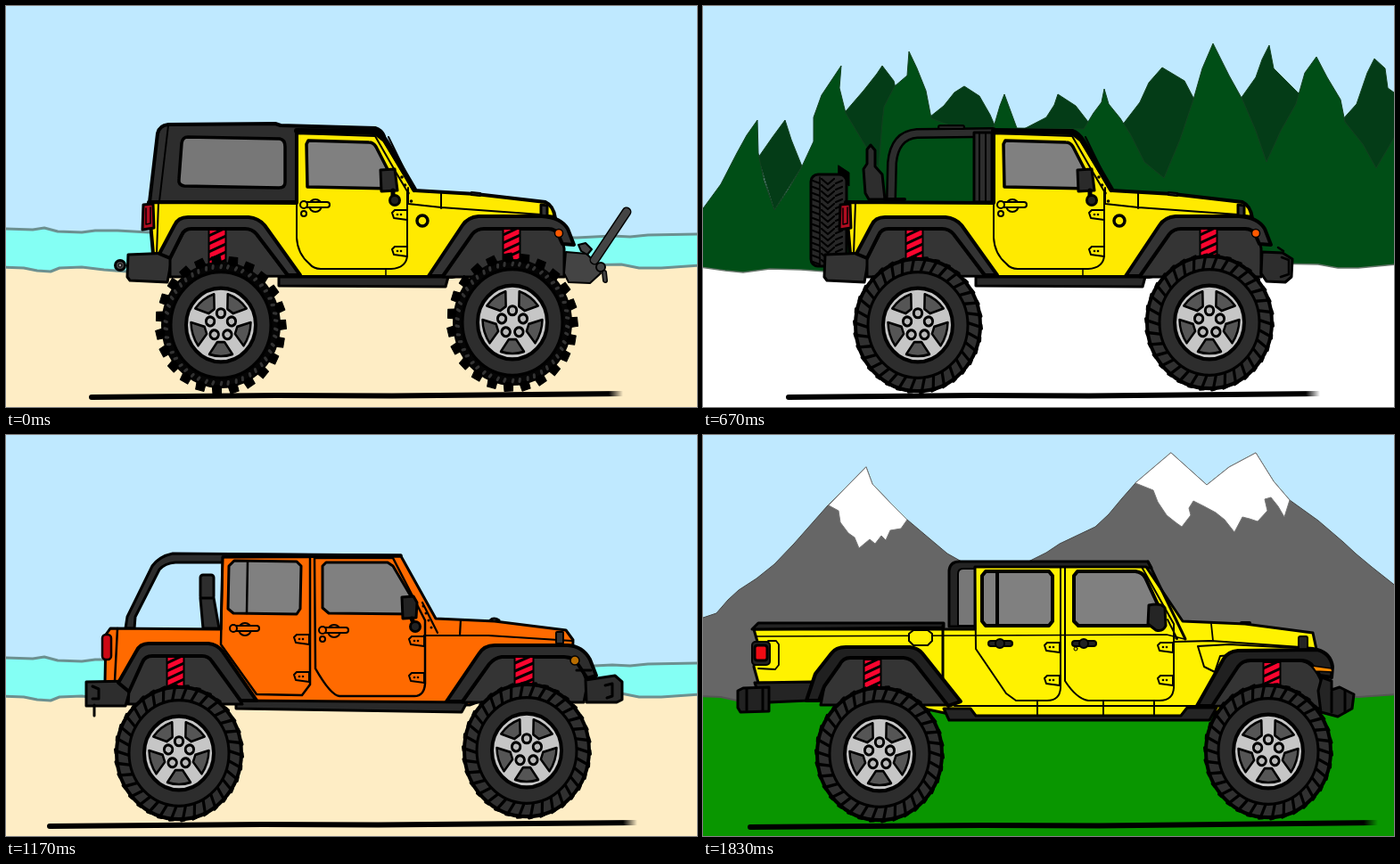
These frames come from a looping animation (775x450 px, 2.17 s). An HTML page with a canvas:

```html
<!DOCTYPE html>
<html lang="en">
<head>
<meta charset="utf-8">
<title>Off-road trucks</title>
<style>
html, body { margin: 0; width: 100%; height: 100%; overflow: hidden; background: #bfe9ff; }
canvas { display: block; }
</style>
</head>
<body>
<canvas id="stage" width="775" height="450"></canvas>
<script>
const ctx = document.getElementById('stage').getContext('2d');
const DARK = '#2d2d2d', GLASS = '#808080', RED = '#f9052f';
const YELLOW = '#ffea00', ORANGE = '#ff6a00';
ctx.lineJoin = ctx.lineCap = 'round';

function shape(d, fill, width = 3, color = '#000') {
  const p = new Path2D(d);
  if (fill) { ctx.fillStyle = fill; ctx.fill(p); }
  if (width) { ctx.lineWidth = width; ctx.strokeStyle = color; ctx.stroke(p); }
}
const line = (d, width = 2, color) => shape(d, null, width, color);

function dot(x, y, r, fill, width = 2) {
  ctx.beginPath();
  ctx.arc(x, y, r, 0, 7);
  if (fill) { ctx.fillStyle = fill; ctx.fill(); }
  if (width) { ctx.lineWidth = width; ctx.strokeStyle = '#000'; ctx.stroke(); }
}

function box(x, y, w, h, r, fill, width = 2) {
  ctx.beginPath();
  ctx.roundRect(x, y, w, h, r);
  ctx.fillStyle = fill; ctx.fill();
  if (width) { ctx.lineWidth = width; ctx.strokeStyle = '#000'; ctx.stroke(); }
}

// Backgrounds
function sky() {
  ctx.fillStyle = '#bfe9ff';
  ctx.fillRect(0, 0, 775, 450);
}

function beach() {
  sky();
  shape('M-4 250L30 251L43 249L58 253L85 254L100 252L125 252L160 254L640 260L680 258L700 259L720 257L779 256V300H-4Z',
    '#84fff4', 3, '#6c9090');
  shape('M-4 293L20 294L35 297L50 298L60 294L85 293L110 296L136 298L640 291L690 290L710 294L735 294L779 291V455H-4Z',
    '#feedc5', 3, '#6c9090');
}

function forest(ground) {
  sky();
  const edge = '#12401f', back = '#043c17';
  shape('M62 170L78 147L92 128L99 150L111 180L80 229Z', back, 1, edge);
  shape('M155 124L180 95L195 76L201 67L214 84L230 150L197 182L165 150Z', back, 1, edge);
  shape('M250 128L270 112L282 97L293 90L310 101L322 122L328 136L300 200Z', back, 1, edge);
  shape('M356 140L385 125L394 111L398 99L418 112L432 130L440 200H356Z', back, 1, edge);
  shape('M470 134L490 108L500 86L515 69L540 84L551 105L540 193H500Z', back, 1, edge);
  shape('M603 104L620 80L627 60L635 44L640 70L660 90L672 102L655 175H615Z', back, 1, edge);
  shape('M715 130L733 110L745 75L753 59L765 70L768 92L779 100V182H740Z', back, 1, edge);
  shape('M-2 230L20 200L38 165L49 145L61 128L62 165L68 195L80 229L95 207L111 180L124 152L124 125L133 100L155 67L153 92L160 120L178 150L197 182L201 130L203 113L215 90L229 78L231 51L240 70L250 95L256 126L290 139L326 136L333 112L338 99L345 118L352 137L427 138L438 120L447 108L450 93L455 110L468 126L480 145L495 175L517 193L535 150L550 105L560 70L572 42L590 78L605 105L620 140L632 175L648 140L665 110L675 75L688 57L700 80L715 105L720 130L740 155L755 182L778 143V320H-2Z',
    '#004e16', 1, edge);
  shape('M-3 293L25 297L45 299L75 295L110 296L150 299L640 289L690 290L712 294L735 294L779 290V455H-3Z',
    ground, 1.5, '#66756a');
}

function mountains() {
  sky();
  shape('M-3 206L15 200L28 185L40 174L60 161L80 145L102 122L140 79L183 36L190 55L210 76L229 95L255 117L274 133L290 142L365 142L385 132L400 122L440 103L455 89L470 71L485 54L525 20L545 38L565 56L590 36L620 20L640 52L658 73L690 96L718 120L732 133L750 148L779 171V310H-3Z',
    '#666', 1, '#444');
  shape('M183 36L190 55L210 76L229 95L222 105L210 107L205 118L200 113L193 122L187 117L175 127L170 115L163 110L154 98L152 85L141 79Z',
    '#fff', 1, '#777');
  shape('M525 20L545 38L565 56L590 36L620 20L640 52L658 73L652 92L645 80L637 70L630 72L633 85L622 97L613 94L605 92L596 109L585 95L575 87L562 80L550 74L545 82L547 90L537 103L530 98L520 90L510 75L505 62L485 54Z',
    '#fff', 1, '#777');
  shape('M-3 293L20 294L38 298L80 295L690 292L735 294L779 291V455H-3Z', '#099600', 2, '#555');
}

// Running gear
function spring(x, y, h, w = 19) {
  box(x - w / 2, y, w, h, 0, RED);
  ctx.save();
  ctx.clip();
  for (let v = y + 3; v < y + h + 10; v += 9) line(`M${x - w / 2} ${v + 4}L${x + w / 2} ${v - 5}`, 3);
  ctx.restore();
}

// Tyres are drawn slightly taller than wide.
function wheel(x, y, style, radius = 73, tall = 1.06) {
  const knobs = style === 'knob';
  ctx.save();
  ctx.translate(x, y);
  ctx.scale(radius / 73, radius / 73 * tall);
  const ring = (n, draw) => {
    for (let i = 0; i < n; i++) {
      ctx.save();
      ctx.rotate(i / n * Math.PI * 2);
      draw();
      ctx.restore();
    }
  };
  if (knobs) {
    dot(0, 0, 67, '#050505', 0);
    ring(23, () => {
      shape('M64 -5L72.5 -5.5L73.5 4L64 5.5Z', '#000', 1);
      line('M60.5 -5L63 -4.5M60.5 4L63 5', 3, '#333');
    });
  } else {
    dot(0, 0, 70, style === 'mud' ? '#4a3300' : '#303030', 4);
    ring(34, () => {
      line('M57 -2L70 2', 3.2);
      line('M71 0L71.5 4', 3);
    });
  }
  dot(0, 0, 56, '#2d2d2d', 3);
  dot(0, 0, 39, radius < 70 ? '#dcdcdc' : '#c6c6c6', 4);
  ctx.rotate(Math.PI / 2);
  ring(5, () => shape('M18 -4L31 -13Q35 0 31 13L18 4Z', '#555', 2.5));
  ctx.rotate(Math.PI / 5);
  ring(5, () => dot(12.5, 0, 4.7, '#b9b9b9', 3));
  ctx.restore();
}

function ground(x1, y1, x2, y2, width = 6) {
  const mid = (x1 + x2) / 2;
  const fade = ctx.createLinearGradient(x2 - 16, 0, x2, 0);
  fade.addColorStop(0, '#000');
  fade.addColorStop(1, width > 4 ? '#0000' : '#000');
  line(`M${x1 + 2} ${y1}L${mid - 90} ${y1 - 2}L${mid + 40} ${y1 - 1.5}L${x2} ${y2}`, width, fade);
}

function hinge(x, y, fill, w = 17) {
  shape(`M${x} ${y - 5}H${x - w + 3}L${x - w} ${y - 2}L${x - w + 2} ${y + 4}L${x} ${y + 6}Z`, fill, 2);
  dot(x - w + 6, y, 1.3, '#000', 0);
  dot(x - w + 10, y, 1.3, '#000', 0);
}

function handle(x, y, fill) {
  dot(x, y + 1, 7, fill);
  box(x - 13, y - 3, 29, 6, 3, fill);
  dot(x - 13, y, 4, fill);
}

function spare() {
  shape('M152 179L164 187V202L152 193Z', '#000', 1);
  box(121, 189, 40, 103, 8, '#272727', 3);
  for (let y = 196; y < 288; y += 7) {
    line(`M123 ${y}L131 ${y + 3}M133 ${y - 2}L140 ${y + 4}L147 ${y - 2}M149 ${y + 3}L156 ${y}`, 2.2);
  }
  line('M131 192V289', 1.5);
}

// Two-door
function shortTruck({ top, tyre, tow, hasSpare, hood }) {
  if (hasSpare) spare();
  if (top) {
    shape('M161 220L170 143Q172 134 182 133L302 132L308 134L414 137Q421 139 424 146L328 148L326 220Z', DARK, 4);
    line('M172 219L182 134', 2);
    shape('M204 147L307 149Q313 150 313 158V198Q313 204 306 204L200 202Q193 201 194 194L197 154Q198 147 204 147Z', '#777', 3.5);
  } else {
    shape('M186 217L182 210L180 183L184 177V161L188 156L193 162V180L201 189L204 217Z', DARK);
    line('M211 217L212 176Q215 145 240 143L325 142', 12);
    line('M211 217L212 176Q215 145 240 143L325 142', 7, DARK);
    box(304, 142, 20, 78, 0, DARK, 3);
    line('M310 143V219M317 143V219');
    box(264, 134, 29, 4, 2, '#222', 2);
    line('M204 217H226', 4);
  }
  shape('M160 220L326 221V142L414 143L424 151L458 207L527 211L605 220Q614 224 616 238L625 275L500 304H326L165 278Z', YELLOW, 4);
  line('M326 140L414 141Q421 143 427 153L458 206', 6);
  line('M171 220L169 278');
  line('M429 147L451 192', 2);
  shape('M326 143V260Q327 278 340 289Q345 295 353 295L432 295Q449 294 450 280V208L437 186L414 146Z', null, 2);
  shape('M339 151L407 153Q412 153 415 158L434 195V205L338 203L337 155Z', GLASS, 3.5);
  line('M451 222L488 226L600 234L616 236M488 208V227M451 204V222', 2);
  line('M426 296V303', 1.5);
  for (let i = 0; i < 4; i++) dot(444 + i * 3.5, 192 + i * 9, 1.8, '#000', 0);
  shape('M522 209L532 210V213L522 212Z', '#222', 2);
  shape('M600 223L607 224V236L600 235Z', '#333');
  if (hood) {
    shape('M424 145L440 148L456 146L455 157L446 161L470 207L520 211L598 221L597 235L552 231L467 230L458 210Z', '#050505', 2);
    line('M471 206L598 221M488 207V214', 1, '#333');
  }
  shape('M420 184L436 183L439 207L421 208Z', '#2a2a2a');
  line('M434 207V218', 5);
  dot(436, 218, 5.5, '#222', 3);
  handle(347, 223, YELLOW);
  dot(334, 233, 3, YELLOW);
  hinge(450, 234, YELLOW);
  hinge(450, 275, YELLOW);
  dot(467, 241, 6, YELLOW, 3.5);

  shape('M306 304H496L493 315L306 314Z', '#292929', 3);
  shape('M137 279L187 277L181 310L139 308L136 304Z', '#333', 3);
  shape('M184 304V283L197 258Q200 250 208 250H268Q276 250 281 256L316 303Z', '#343434', 3);
  shape('M172 278L189 246Q193 237 204 237H272Q283 238 290 246L330 302H316L281 256Q276 250 268 250H208Q200 250 197 257L184 283Z', '#333', 4);
  shape('M490 304L523 256Q528 250 536 250H610Q622 252 626 272V304Z', '#343434', 3);
  shape('M474 303L512 246Q518 237 530 236H601Q622 237 630 250L637 268L624 267L620 258Q617 250 608 250H536Q528 250 523 256L490 303Z', '#333', 4);
  dot(620, 255, 4.5, '#ff5a00', 1.5);
  if (tow) {
    dot(128, 291, 5.5, '#444', 3);
    dot(128, 291, 2, '#999', 1);
    shape('M628 276L651 278L664 291L667 300L655 311L631 310L626 300Z', '#444', 2);
    shape('M642 268L650 266L657 273L652 279L645 275Z', '#444', 2);
    line('M660 285L696 231', 11);
    line('M660 285L696 231', 8, '#444');
    dot(667, 293, 5, '#444');
    line('M671 299L672 308', 6);
    line('M671 299L672 308', 3, '#444');
  } else {
    shape('M627 276L650 277L661 284L660 304L653 310L632 309L626 300Z', DARK, 3);
    line('M649 282L657 285V301L648 304M645 271L651 275', 2.5);
  }
  shape('M154 223L165 222L166 249L153 251Z', '#b00d20', 3);
  line('M157 227V245L162 244V226', 1.5);
  spring(237, 251, 39);
  spring(567, 250, 39);
  ground(94, 439, 692, 435);
  wheel(241, 358, tyre);
  wheel(568, 355, tyre);
}

// Four-door
function longTruck({ lifted }) {
  shape('M134 217L136 204L164 147Q172 136 187 133L443 135V143L190 143Q178 144 172 151L145 204L144 217Z', DARK, 3);
  box(218, 157, 15, 27, 3, DARK, 3);
  shape('M218 183H233L239 217H221Z', DARK, 3);
  shape('M117 217L241 218L243 137L443 136L482 206L548 209L628 219L636 230L635 260L520 303L262 300L111 277L112 224Z', ORANGE, 3);
  line('M243 134L443 135', 3);
  line('M125 217L122 276', 2.5);
  shape('M243 137H341V280L332 292L281 291L241 235Z', null, 2.5);
  shape('M346 138L434 138L470 208V279Q469 293 458 293H374Q364 292 347 262Z', null, 2.5);
  shape('M256 141L326 142L331 147L330 195L326 201L255 200L249 195L250 147Z', GLASS, 3);
  line('M271 142L270 200', 2.5);
  shape('M359 143H428L434 147L457 186V201L362 200L355 194V147Z', GLASS, 3);
  line('M469 225H541L635 231M510 207L509 225M467 188L484 222', 2.2);
  for (let i = 0; i < 4; i++) dot(468 + i * 3, 192 + i * 8, 1.5, '#000', 0);
  line('M543 208Q547 204 553 208', 3);
  box(617, 221, 8, 13, 1, '#333');
  shape('M444 182L457 181L461 188L460 205L445 206Z', '#222');
  line('M455 206L459 216', 5);
  dot(459, 215, 5.5, '#222', 3);
  handle(268, 217, ORANGE);
  handle(368, 219, ORANGE);
  dot(355, 229, 3, ORANGE);
  hinge(340, 229, ORANGE);
  hinge(340, 271, ORANGE);
  hinge(469, 231, ORANGE);
  hinge(469, 272, ORANGE);

  shape('M258 298L517 300L511 311L258 307Z', '#292929', 3);
  shape('M90 277L142 276L134 304H90Z', DARK, 3);
  line('M97 282L104 285V296H97M99 303V315', 3);
  shape('M137 302L138 286L153 255Q156 248 164 248H220Q228 248 233 255L265 302Z', '#343434', 3);
  shape('M126 278L146 243Q150 234 160 234H227Q237 235 243 243L281 298H263L231 254Q227 248 220 248H164Q156 248 153 255L138 288Z', DARK, 4);
  shape('M512 300L542 257Q548 250 556 249H626Q645 251 652 280L648 300Z', '#343434', 3);
  shape('M494 299L530 246Q536 236 548 236H630Q647 237 655 252L662 270L652 273L642 258Q638 249 626 249H556Q548 250 542 257L512 299Z', DARK, 4);
  line('M640 264H656', 3);
  shape('M650 275L683 270L691 277V297L685 300L651 300Z', DARK, 3);
  line('M672 281L680 279V293L674 295', 3);
  dot(638, 253, 5, '#b86d00', 1.5);
  box(108, 224, 10, 28, 4, '#cc0814', 2.5);
  if (lifted) {
    spring(190, 249, 36);
    spring(581, 249, 36, 21);
    ground(47, 439, 708, 435);
    wheel(194, 357, 'plain');
    wheel(584, 354, 'plain');
  } else {
    spring(188, 248, 27);
    spring(587, 249, 24, 21);
    ground(77, 390, 678, 386, 4);
    wheel(195, 328, 'plain', 59, 1.02);
    wheel(586, 325, 'plain', 59, 1.02);
  }
}

// Pickup
function pickup({ paint, tyre, roof, ends }) {
  shape('M276 215V152Q277 142 288 142L499 142L503 149H305V215Z', '#242424', 3);
  shape('M286 214V156Q286 150 292 150H305V214Z', '#777', 2);
  shape('M57 218H305V148H497L538 209L608 212L684 222L690 250L640 290L560 316H290L120 280L62 278L57 260L61 232Z', paint, 3);
  if (roof) line('M283 140H498', 5);
  line('M499 142L541 229', 3);
  shape('M55 218L62 211H270V216Z', '#222', 3);
  line('M269 214V290', 3);
  line('M60 226L305 225L520 224L540 229', 1.5);
  line('M282 304H560M375 298V314M449 298V314M506 298V314M401 148V240', 2);
  shape('M305 148H401V284Q400 298 386 298H351L340 290L306 240Z', null, 2);
  shape('M406 148H492L528 212V284Q527 298 512 298H432Q419 296 406 276Z', null, 2);
  shape('M317 153H388L392 158V209L388 214H317L313 209V158Z', GLASS, 4);
  line('M330 155V213', 4);
  shape('M420 153H485Q493 154 496 160L510 190V214H421L416 209V158Z', GLASS, 4);
  shape('M500 191Q514 188 518 194L519 214Q516 221 508 219L499 212Z', '#252525', 3);
  shape('M236 219H252L257 223V231L252 236H236L231 231V223Z', paint, 2);
  line('M529 232L570 231L685 239M570 212L572 231M521 207L532 229', 1.8);
  shape('M555 237L590 235L685 240L580 248L574 266L562 260Z', paint, 2);
  dot(531, 228, 1.8, '#000', 0);
  line('M604 211H613', 4);
  box(668, 226, 10, 16, 2, '#252525', 2);
  for (const x of [333, 427]) {
    box(x - 13, 231, 27, 6, 3, '#222');
    dot(x, 234, 5, '#222');
  }
  dot(418, 240, 2, paint, 1);
  for (const x of [400, 527]) {
    hinge(x, 238, paint);
    hinge(x, 275, paint);
  }
  shape('M73 231H82L85 235V258L81 263L62 262', null, 1.8);
  box(55, 232, 20, 26, 4, '#222', 2);
  box(58, 236, 14, 17, 3, '#f00b13', 3);

  shape('M58 278L122 277L118 298L74 300L61 287Z', '#242424', 3);
  shape('M39 287L45 284L74 283V310L42 311L39 306Z', '#222', 3);
  line('M49 285V309M67 285V309', 3);
  shape('M270 307H300L306 315H536L543 306H576L568 320H276Z', '#242424', 3);
  shape('M132 303L136 282L153 258Q157 250 165 250H225Q234 251 239 258L275 303Z', '#343434', 3);
  shape('M116 298L126 268L144 245Q149 238 160 238H232Q241 239 246 245L289 299L275 304L239 258Q234 251 225 250H165Q157 250 153 258L136 282L130 298Z', '#202020', 4);
  shape('M571 304L600 260Q605 253 614 253H670Q688 255 697 287L692 307Z', '#343434', 3);
  shape('M554 304L584 251Q589 243 600 242L689 241Q704 245 706 260L705 272L692 270L682 257Q677 253 670 253H614Q605 253 600 260L571 304Z', '#202020', 4);
  shape('M683 259L705 262L706 266L687 265Z', '#ff8c00', 1.5);
  shape('M694 272L705 276V286L714 283L730 291L728 307L712 316L693 311L690 287Z', '#242424', 3);
  line('M705 288V311M720 287V311', 3);
  spring(190, 252, 39);
  spring(638, 255, 36);
  ground(...ends);
  const knobs = tyre === 'knob';
  wheel(knobs ? 196 : 198, 358, tyre);
  wheel(knobs ? 637 : 634, knobs ? 356 : 355, tyre);
}

const snow = () => forest('#fff');
const meadow = () => forest('#099600');
const wide = [49, 439, 760, 436], narrow = [51, 440, 757, 435];
const scenes = [
  [0, beach, shortTruck, { top: true, tyre: 'knob', tow: true }],
  [170, beach, shortTruck, { tyre: 'plain', hasSpare: true }],
  [330, beach, shortTruck, { top: true, tyre: 'mud', hasSpare: true }],
  [500, snow, shortTruck, { tyre: 'knob', hood: true }],
  [670, snow, shortTruck, { tyre: 'plain', hasSpare: true }],
  [830, snow, longTruck, { lifted: false }],
  [1000, meadow, longTruck, { lifted: true }],
  [1170, beach, longTruck, { lifted: true }],
  [1330, mountains, longTruck, { lifted: true }],
  [1500, mountains, pickup, { paint: '#ff0012', tyre: 'knob', ends: wide }],
  [1670, mountains, pickup, { paint: '#fff200', tyre: 'knob', roof: true, ends: wide }],
  [1830, mountains, pickup, { paint: '#fff200', tyre: 'plain', ends: narrow }],
];

const LOOP = 2170, start = performance.now();
let shown = null;

function render() {
  const t = (performance.now() - start) % LOOP;
  const scene = scenes.findLast(s => s[0] <= t) || scenes[0];
  if (scene !== shown) {
    shown = scene;
    const [, backdrop, truck, look] = scene;
    backdrop();
    truck(look);
  }
  requestAnimationFrame(render);
}
render();
</script>
</body>
</html>
```
